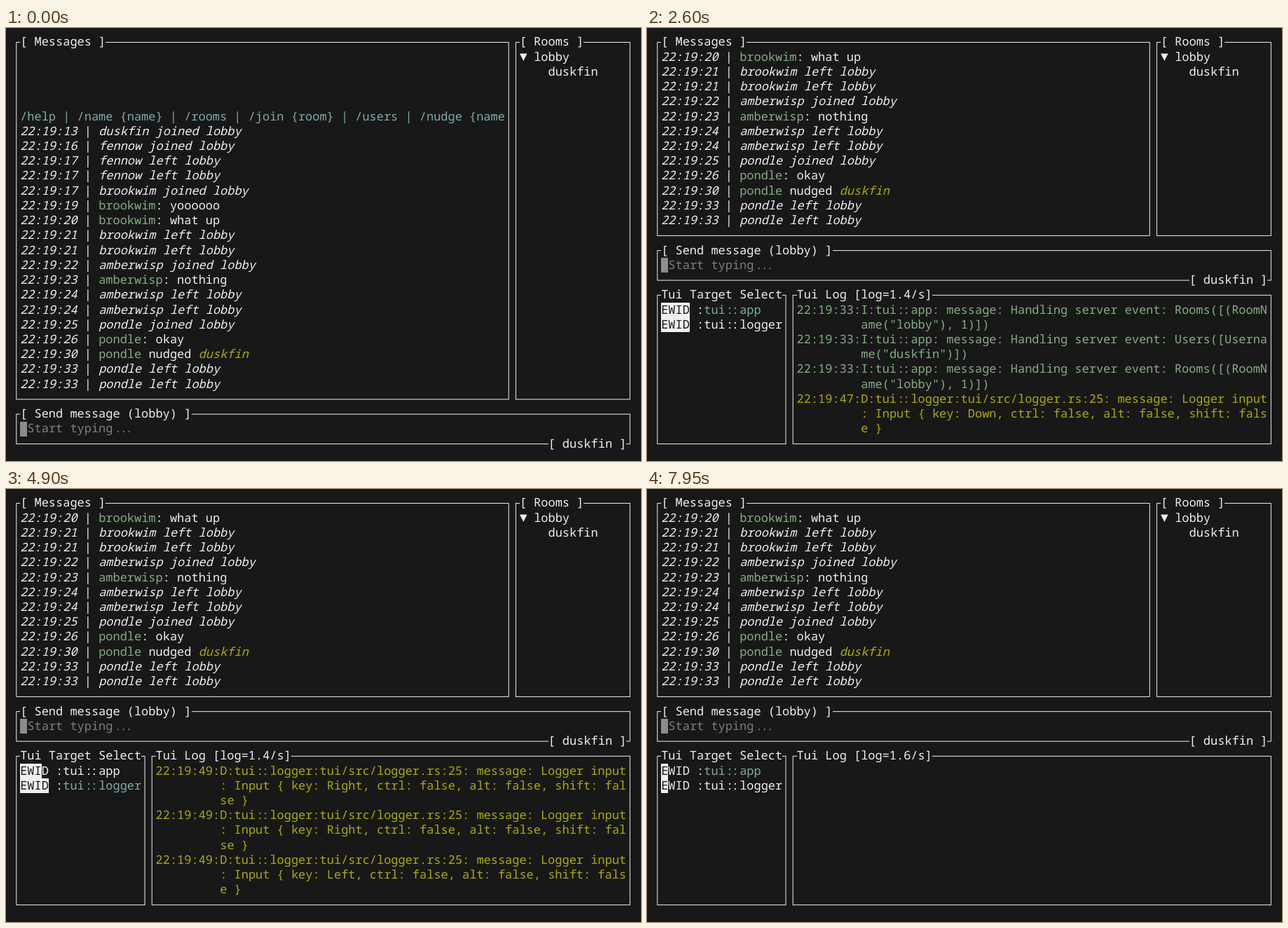
Write an HTML page that moves like this. It is 906 px wide and 618 px high and loops after 8 s.

```html
<!DOCTYPE html>
<html lang="en">
<head>
<meta charset="utf-8">
<title>Terminal chat</title>
<style>
  html, body { margin: 0; width: 100%; height: 100%; overflow: hidden; background: #181818; }
  svg { display: block; }
  text { font: 16.966px "Noto Sans Mono", monospace; white-space: pre; text-rendering: geometricPrecision; }
  .i { font-style: italic; }
</style>
</head>
<body>
<svg id="screen" width="906" height="618" viewBox="0 0 906 618"></svg>
<script>
const LOOP = 8000, CW = 10.18, RH = 21.23, LEFT = 10, TOP = 9.8, LAST = 86;
const BG = '#181818', FG = '#efefef', GREEN = '#85ad83', CYAN = '#7fabab',
      YELLOW = '#adab08', GRAY = '#7f7f7f', CURSOR = '#8c8c8c';
const ME = 'duskfin';

// A message is [time, name, action] for events or [time, name, ': text'] for speech.
const messages = [
  ['13', ME, ' joined lobby'],
  ['16', 'fennow', ' joined lobby'],
  ['17', 'fennow', ' left lobby'],
  ['17', 'fennow', ' left lobby'],
  ['17', 'brookwim', ' joined lobby'],
  ['19', 'brookwim', ': yoooooo'],
  ['20', 'brookwim', ': what up'],
  ['21', 'brookwim', ' left lobby'],
  ['21', 'brookwim', ' left lobby'],
  ['22', 'amberwisp', ' joined lobby'],
  ['23', 'amberwisp', ': nothing'],
  ['24', 'amberwisp', ' left lobby'],
  ['24', 'amberwisp', ' left lobby'],
  ['25', 'pondle', ' joined lobby'],
  ['26', 'pondle', ': okay'],
  ['30', 'pondle', ' nudged '],
  ['33', 'pondle', ' left lobby'],
  ['33', 'pondle', ' left lobby']
];

const info = s => '22:19:33:I:tui::app: message: Handling server event: ' + s;
const users = info(`Users([Username("${ME}")])`);
const rooms = info('Rooms([(RoomName("lobby"), 1)])');
const left = info('RoomEvent { room: RoomName("lobby"), from_username: Username("pondle"), ' +
  'date: "22:19:33", event: Left(RoomName("lobby")) }');
const appLog = [left, users, rooms, users, rooms];

const keys = [[2600, 47, 'Down'], [3400, 47, 'Down'], [3900, 48, 'Right'],
              [4050, 49, 'Right'], [4350, 49, 'Right'], [4900, 49, 'Left']];
const keyLog = ([, sec, key]) => `22:19:${sec}:D:tui::logger:tui/src/logger.rs:25: message: ` +
  `Logger input: Input { key: ${key}, ctrl: false, alt: false, shift: false }`;

// Step functions of time: [start, value] pairs.
const tracks = {
  panel: [[0, false], [950, true]],
  wide: [[0, false], [2600, true]],
  rate: [[0, '2.3'], [2600, '1.4'], [5200, '1.5'], [7650, '1.6']],
  picked: [[0, 0], [4900, 1], [6050, 0]],
  app: [[0, 4], [4350, 3], [6450, 4], [7650, 3], [7800, 2], [7950, 1]],
  logger: [[0, 4], [5200, 3], [5350, 2], [5700, 1]],
  pressed: [[0, 0], ...keys.map(([at], i) => [at, i + 1])]
};
const stateAt = t => Object.fromEntries(Object.entries(tracks).map(
  ([name, steps]) => [name, steps.filter(([at]) => at <= t).pop()[1]]));

const X = c => LEFT + c * CW, Y = r => TOP + r * RH;
let out;

function block(c, r, n, color) {
  const x = Math.round(X(c)), y = Math.round(Y(r));
  out += `<rect x="${x}" y="${y}" width="${Math.round(X(c + n)) - x}" ` +
         `height="${Math.round(Y(r + 1)) - y}" fill="${color}"/>`;
}

// Writes a run of text and returns the column after it; "::" and "..." sit tighter.
function put(c, r, s, color = FG, italic = false) {
  const body = s.replace(/::(.)/g, '<tspan dx="1.2 -2.4 1.2">::$1</tspan>')
                .replace('...', '<tspan dx="2.2 -2.2 -2.2">...</tspan>');
  out += `<text x="${X(c).toFixed(2)}" y="${(Y(r) + 15.6).toFixed(2)}" fill="${color}"` +
         `${italic ? ' class="i"' : ''}>${body}</text>`;
  return c + s.length;
}

function label(c, r, s) {
  block(c, r, s.length, BG);
  put(c, r, s);
}

function box(c0, r0, c1, r1, title) {
  const x = X(c0) + 4.8, y = Y(r0 + .5);
  out += `<rect x="${x.toFixed(2)}" y="${y.toFixed(2)}" width="${((c1 - c0) * CW).toFixed(2)}" ` +
         `height="${((r1 - r0) * RH).toFixed(2)}" fill="none" stroke="${FG}"/>`;
  label(c0 + 1, r0, title.slice(0, c1 - c0 - 1));
}

function message(r, [sec, name, rest]) {
  put(1, r, '22:19:' + sec, FG, true);
  put(10, r, '|');
  const nudge = rest === ' nudged ';
  if (nudge || rest[0] === ':') {
    const c = put(put(12, r, name, GREEN), r, rest);
    if (nudge) put(c, r, ME, YELLOW, true);
  } else put(12, r, name + rest, FG, true);
}

function chat(end) {
  box(0, 0, 69, end, '[ Messages ]');
  const shown = messages.slice(1 - end);
  const top = end - shown.length;
  shown.forEach((m, i) => message(top + i, m));
  if (top > 1) put(1, top - 1, '/help | /name {name} | /rooms | /join {room} | /users | /nudge {name', CYAN);

  box(70, 0, LAST, end, '[ Rooms ]');
  out += `<path d="M733 36.5h10.5l-5.25 10.5z" fill="${FG}"/>`;
  put(73, 1, 'lobby');
  put(75, 2, ME);

  box(0, end + 1, LAST, end + 3, '[ Send message (lobby) ]');
  block(1, end + 2, 1, CURSOR);
  put(2, end + 2, 'Start typing...', GRAY);
  label(75, end + 3, `[ ${ME} ]`);
}

function target(r, name, level, picked) {
  block(1, r, level, FG);
  put(1, r, 'EWID'.slice(0, level), BG);
  put(1 + level, r, 'EWID'.slice(level));
  put(6, r, ':');
  put(7, r, name, picked ? CYAN : FG);
}

function wrap(s, width) {
  const lines = [s.slice(0, width)];
  for (let i = width; i < s.length; i += width - 9) lines.push(' '.repeat(9) + s.slice(i, i + width - 9));
  return lines;
}

function logPanel(s) {
  const split = s.wide ? 18 : 15;
  box(0, 17, split, 27, 'Tui Target Select');
  target(18, 'tui::app', s.app, s.picked === 0);
  if (s.wide) target(19, 'tui::logger', s.logger, s.picked === 1);

  box(split + 1, 17, LAST, 27, `Tui Log [log=${s.rate}/s]`);
  const paint = (list, color) => list.flatMap(e => wrap(e, 84 - split).map(line => [line, color]));
  const lines = [
    ...paint(s.app > 2 ? appLog : [], GREEN),
    ...paint(s.logger > 3 ? keys.slice(0, s.pressed).map(keyLog) : [], YELLOW)
  ];
  lines.slice(-9).forEach(([line, color], i) => {
    const indent = line.length - line.trimStart().length;
    put(split + 2 + indent, 18 + i, line.slice(indent), color);
  });
}

const screenEl = document.getElementById('screen');
let shownKey;

function frame() {
  const s = stateAt(performance.now() % LOOP);
  const key = JSON.stringify(s);
  if (key !== shownKey) {
    shownKey = key;
    out = '';
    chat(s.panel ? 13 : 24);
    if (s.panel) logPanel(s);
    screenEl.innerHTML = out;
  }
  requestAnimationFrame(frame);
}
frame();
</script>
</body>
</html>
```
